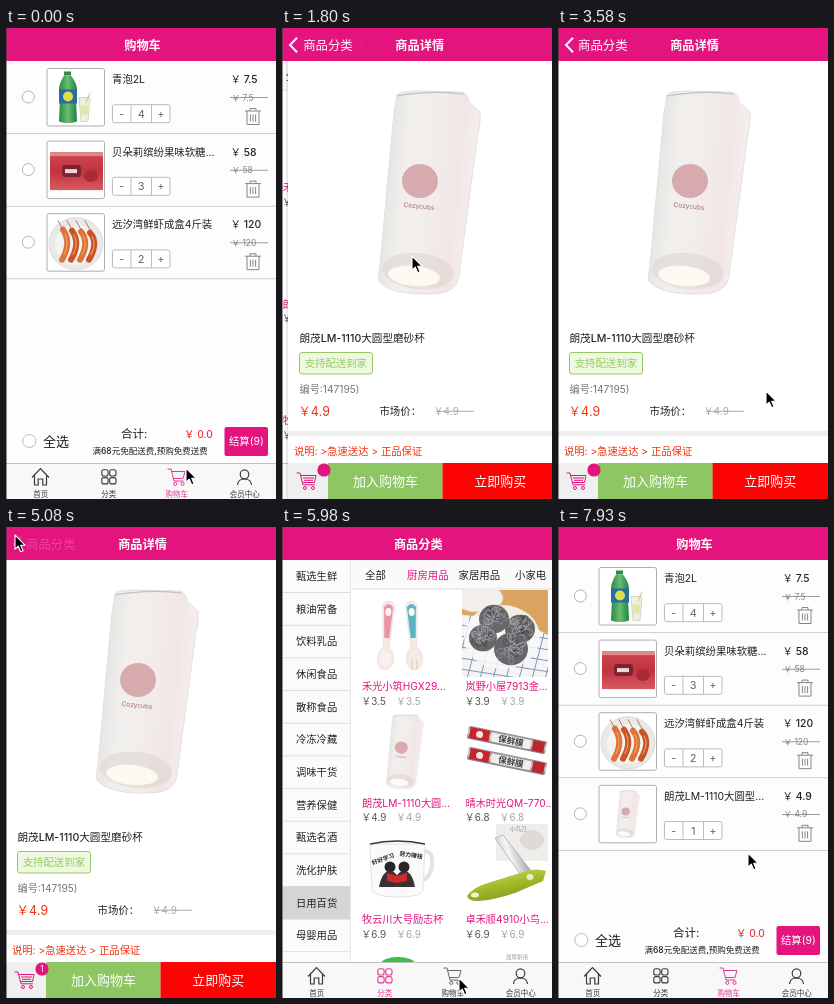
Animation, 270 px wide and 471 px high, one loop 8 s. Source, as an HTML page with a canvas:

```html
<!DOCTYPE html>
<html lang="zh-CN">
<head>
<meta charset="utf-8">
<title>购物车</title>
<style>
html, body { margin: 0; width: 100%; height: 100%; overflow: hidden; background: #fff; }
canvas { display: block; width: 270px; height: 471px; }
</style>
</head>
<body>
<canvas id="stage"></canvas>
<script>
const W = 270, H = 471, LOOP = 8000, STEP = 150;
const PINK = '#e4147f', INK = '#222', RED = '#f0320f', TAU = Math.PI * 2;
const FONT = 'Inter, "Noto Sans CJK SC", "Noto Sans CJK", sans-serif';
const canvas = document.getElementById('stage');
const ctx = canvas.getContext('2d');
const dpr = window.devicePixelRatio || 1;
canvas.width = W * dpr;
canvas.height = H * dpr;

// ---- drawing helpers ----
function text(s, x, y, size, color = INK, weight = 400, align = 'left') {
  ctx.font = `${weight} ${size}px ${FONT}`;
  ctx.textAlign = align;
  ctx.fillStyle = color;
  ctx.fillText(s, x, y + size * 0.37);
}
function rect(x, y, w, h, color) {
  ctx.fillStyle = color;
  ctx.fillRect(x, y, w, h);
}
function paint(fill, stroke, width = 1) {
  if (fill) { ctx.fillStyle = fill; ctx.fill(); }
  if (stroke) { ctx.strokeStyle = stroke; ctx.lineWidth = width; ctx.stroke(); }
}
function round(x, y, w, h, r, fill, stroke, width) {
  ctx.beginPath();
  ctx.roundRect(x, y, w, h, r);
  paint(fill, stroke, width);
}
function oval(x, y, rx, ry, fill, stroke, width, turn = 0) {
  ctx.beginPath();
  ctx.ellipse(x, y, rx, ry, turn, 0, TAU);
  paint(fill, stroke, width);
}
function shape(d, fill, stroke, width) {
  const p = new Path2D(d);
  if (fill) { ctx.fillStyle = fill; ctx.fill(p); }
  if (stroke) { ctx.strokeStyle = stroke; ctx.lineWidth = width || 1; ctx.stroke(p); }
}
function at(x, y, scale, draw, turn = 0) {
  ctx.save();
  ctx.translate(x, y);
  ctx.rotate(turn);
  ctx.scale(scale, scale);
  draw();
  ctx.restore();
}
function blend(x0, y0, x1, y1, ...colors) {
  const g = ctx.createLinearGradient(x0, y0, x1, y1);
  colors.forEach((c, i) => g.addColorStop(i / (colors.length - 1), c));
  return g;
}

// ---- product pictures ----
function cup() {
  shape('M-33 -98Q-31 -102 -10 -102L32 -101Q38 -99 39 -91L50 -81Q51 -73 48 -60L29 83Q27 101 0 101Q-40 102 -51 88Q-52 83 -50 72L-36 -80Z',
    blend(-52, 0, 50, 10, '#e4e2df', '#f1efed', '#f2edeb', '#f1e6e5', '#f6f3f3'), '#dfdbd9', 0.8);
  shape('M-33 -97Q0 -103 34 -99', null, '#c4c0bf', 1.2);
  oval(-12, 78, 36, 18, 'rgba(205,199,190,.35)', null, 0, 0.1);
  oval(-16, 83, 26, 10, 'rgba(255,252,245,.9)', null, 0, 0.1);
  oval(-10, -12, 18, 17, 'rgba(190,104,112,.5)');
  at(-11, 13, 1, () => text('Cozycubs', 0, 0, 6.6, '#a9666d', 400, 'center'), 0.1);
}
function bottle() {
  rect(-4, -26, 7, 4, '#2c8d3f');
  shape('M-4 -22H3Q9 -14 9 -8L8 2L9 24Q0 27 -9 24L-8 2L-9 -8Q-9 -14 -4 -22Z', blend(-9, 0, 9, 0, '#2a8a42', '#69bd70', '#1f8340'));
  rect(-9, -8, 18, 14, '#276da5');
  oval(0, -1, 5, 5, '#d9e04b');
  shape('M11 0H22L20 24H13Z', '#eef0df', '#c4c9bb', 0.7);
  rect(13, 8, 7, 9, '#e3e79f');
  shape('M18 5L22 -5', null, '#c5c98a', 1);
}
function candy() {
  rect(-26, -18, 53, 38, blend(0, -18, 0, 20, '#cf4951', '#c2323f', '#d75a61'));
  rect(-26, -18, 53, 4, '#dd8a8c');
  round(-14, -5, 19, 12, 3, '#7d2434');
  rect(-11, -1, 12, 4, '#ecd9d4');
  oval(15, 6, 7, 6, '#a92a37');
}
function shrimp() {
  oval(0, 1, 27, 26, '#e9e9ea', '#d0d0d0', 0.7);
  oval(0, 2, 21, 20, '#f6f3ef');
  ctx.lineCap = 'round';
  for (let i = 0; i < 4; i++) {
    const x = -13 + i * 9;
    shape(`M${x} ${-13 + i}Q${x + 9} 0 ${x - 1} 17`, null, i % 2 ? '#c95526' : '#dd7438', 6);
    shape(`M${x + 2} ${-9 + i}Q${x + 7} 1 ${x + 1} 12`, null, '#eeaa79', 1);
    shape(`M${x} -13L${x - 5} -22`, null, '#b95432', 0.8);
  }
  ctx.lineCap = 'butt';
}
function cutlery() {
  for (const [x, color, lean] of [[105, '#eb93a8', 0.06], [131, '#59b5c1', -0.06]]) {
    at(x, 107, 1, () => {
      shape('M-6 -29Q0 -37 6 -29L3 14Q9 18 8 28Q5 36 0 36Q-6 36 -8 28Q-9 18 -3 14Z', '#f6e9e6', '#e8d8d4', 0.6);
      shape('M-4.5 -27Q0 -33 4.5 -27L2.5 4H-2.5Z', color);
      oval(0, -22, 3, 4, '#fff4ef');
      if (lean < 0) shape('M-3 36V26M2 36V26', null, '#dfcfcb', 1.2);
      else oval(0, 25, 5, 7, '#fbf0ed');
    }, lean);
  }
}
function wool() {
  ctx.save();
  ctx.beginPath();
  ctx.rect(180, 63, 86, 87);
  ctx.clip();
  rect(180, 63, 86, 87, '#f4f4f6');
  for (let k = 0; k < 9; k++) {
    shape(`M${172 + k * 13} 152L${190 + k * 13} 84M178 ${98 + k * 11}L268 ${112 + k * 11}`, null, '#8195b5', 1);
  }
  shape('M180 63H266V108L236 92L180 88Z', '#dba561');
  oval(196, 71, 25, 14, '#f3f0ec', '#d9d3ca', 1);
  oval(220, 110, 38, 32, 'rgba(250,250,250,.85)');
  let seed = 7;
  const rnd = () => (seed = seed * 16807 % 2147483647) / 2147483647;
  for (const [x, y, r] of [[212, 92, 15], [238, 102, 15], [201, 111, 14], [229, 122, 17]]) {
    oval(x, y, r, r * 0.95, '#67676a');
    for (let i = 0; i < 28; i++) {
      const a = rnd() * TAU, d = Math.sqrt(rnd()) * r * 0.7;
      oval(x + Math.cos(a) * d, y + Math.sin(a) * d, 2 + rnd() * 3, 1.5 + rnd() * 2, null, ['#94959a', '#3e3e41', '#b4b5b8'][i % 3], 0.7, a);
    }
  }
  ctx.restore();
}
function film() {
  for (const y of [213, 234]) {
    at(225, y, 1, () => {
      round(-40, -6.5, 80, 13, 2, blend(0, -7, 0, 7, '#8d8b8b', '#d8d5d4', '#827878'));
      rect(-38, -5.5, 20, 11, '#c6252f');
      rect(-16, -4.5, 40, 9, '#f1eeee');
      rect(26, -5.5, 12, 11, '#b9272f');
      text('保鲜膜', 4, 0, 8.5, '#3c3c3c', 700, 'center');
      oval(-28, 0, 3.5, 3.5, '#f3e3e3');
    }, 0.2);
  }
}
function mug() {
  shape('M141 325Q151 322 150 337Q149 351 140 353', null, '#e4e2e2', 4);
  shape('M88 317H143L141 364Q137 370 116 370Q94 370 90 364Z', '#fbfafa', '#dedcdc', 0.8);
  shape('M88 317Q115 311 143 317', null, '#3b3939', 1.3);
  at(101, 332, 1, () => text('好好学习', 0, 0, 5.8, '#222', 700, 'center'), -0.35);
  at(129, 328, 1, () => text('努力赚钱', 0, 0, 5.8, '#222', 700, 'center'), 0.15);
  for (const x of [108, 122]) {
    oval(x, 340, 5.5, 5.5, '#2b2626');
    shape(`M${x - 11} 360Q${x - 8} 344 ${x} 344Q${x + 8} 344 ${x + 11} 360Z`, '#3a3232');
  }
  shape('M105 346L115 349L125 346V354L115 356L105 354Z', '#d0282f');
}
function peeler() {
  rect(214, 297, 52, 37, '#efedea');
  oval(250, 313, 12, 10, '#dedad5');
  text('小鸟刀', 228, 302, 5.5, '#888');
  shape('M213 311L221 308L254 350L244 356Z', blend(214, 330, 240, 322, '#c2c5c7', '#f4f5f5', '#aeb1b3'), '#a3a6a8', 0.7);
  shape('M185 369Q191 360 209 355L238 346Q254 340 264 344L261 354L233 366Q212 373 196 374Q186 374 185 369Z',
    blend(200, 346, 206, 375, '#c3d554', '#a4bd2b', '#869f25'));
  oval(248, 350, 3.5, 3, '#e9edc4');
  oval(193, 368, 4, 2.5, '#f0f3d0');
}

// ---- icons ----
function trolley(x, y, color) {
  at(x, y, 1, () => {
    shape('M-9 -8H-5.5L-2.5 4H7M-4.9 -5.5H8.5L6.5 1.5H-3', null, color, 1);
    oval(-1.2, 6.8, 1.6, 1.6, null, color);
    oval(6, 6.8, 1.6, 1.6, null, color);
  });
}
function basket(color) {
  shape('M8.5 445H12L15 456.8H27M12.6 447.5H28L26.5 454.5H14.4M15 450H26M16 452.3H25', null, color, 1);
  oval(17, 460, 1.5, 1.5, null, color);
  oval(25, 460, 1.5, 1.5, null, color);
}
function trash(x, y) {
  at(x, y, 1, () => {
    shape('M-8 -5.5H8M-3 -5.5V-8H3V-5.5M-6 -5.5V8H6V-5.5M-2.6 -2V5M0 -2V5M2.6 -2V5', null, '#858585', 1);
  });
}
function tabBar(active) {
  rect(0, 435, W, 36, '#f8f8f8');
  rect(0, 435, W, 0.8, '#b5b5b5');
  const tint = (i, idle = '#3a3a3a') => i === active ? '#e23c95' : idle;
  shape('M26 449.5L34.5 440.5L43 449.5M28.5 447.5V457H32.2V451H36.8V457H40.5V447.5', null, tint(0), 1.2);
  for (let i = 0; i < 4; i++)
    round(95.8 + (i % 2) * 7.9, 441.7 + (i >> 1) * 7.9, 6.3, 6.3, 2, null, tint(1), 1.1);
  trolley(170.5, 449, tint(2, '#666'));
  oval(238.5, 446.3, 4.3, 4.5, null, tint(3), 1.2);
  shape('M231.5 457Q232 451 238.5 451Q245 451 245.5 457', null, tint(3), 1.2);
  ['首页', '分类', '购物车', '会员中心'].forEach((s, i) => text(s, 34.7 + i * 68, 466, 7.5, tint(i), 400, 'center'));
}

// ---- pages ----
const goods = [
  ['青泡2L', '7.5', 4, bottle],
  ['贝朵莉缤纷果味软糖…', '58', 3, candy],
  ['远汐湾鲜虾成盒4斤装', '120', 2, shrimp],
  ['朗茂LM-1110大圆型…', '4.9', 1, () => at(0, 0, 0.235, cup)]
];
function cartPage(rows) {
  rect(0, 0, W, H, '#fdfdfd');
  goods.slice(0, rows).forEach(([name, price, count, picture], i) => {
    const y = 33 + i * 72.6;
    oval(22.3, y + 36, 6, 6, '#fff', '#a3b0bd', 0.9);
    round(41, y + 7.5, 57.5, 57.5, 2, '#fff', '#a5a5a5', 0.9);
    at(i ? 70 : 62, y + 36.5, 1, picture);
    text(name, 106, y + 18.3, 10.4);
    round(106.5, y + 43.7, 57.5, 18, 2, '#fff', '#b5b5b5', 0.9);
    rect(124.5, y + 44, 0.9, 17.5, '#b5b5b5');
    rect(145, y + 44, 0.9, 17.5, '#b5b5b5');
    ['-', count, '+'].forEach((s, k) => text(s, 115.5 + k * 19.7, y + 52.8, 11, '#666', 400, 'center'));
    text('￥ ' + price, 224.5, y + 18.3, 10.4, INK, 500);
    text('￥ ' + price, 225.5, y + 36.5, 8.5, '#858585');
    rect(224, y + 36.2, 38, 0.8, '#858585');
    trash(247, y + 55.5);
    rect(0, y + 72.2, W, 0.8, '#c6c6c6');
  });
  oval(23.3, 413, 6.5, 6.5, '#fff', '#b0b5ba', 0.9);
  text('全选', 37, 413, 13);
  text('合计:', 115, 406, 11.5);
  text('￥ 0.0', 178, 406.5, 10.4, '#f01818');
  text('满68元免配送费,预购免费送费', 86.5, 423.3, 8.5, INK, 500);
  round(218.5, 399, 43.5, 29, 2, PINK);
  text('结算(9)', 240.3, 413.5, 10.4, '#fff', 400, 'center');
  tabBar(2);
  header();
  text('购物车', 136.5, 17, 12.2, '#fff', 600, 'center');
}

const kinds = ['甄选生鲜', '粮油常备', '饮料乳品', '休闲食品', '散称食品', '冷冻冷藏',
  '调味干货', '营养保健', '甄选名酒', '洗化护肤', '日用百货', '母婴用品'];
const shelf = [
  ['禾光小筑HGX29…', '3.5'], ['岚野小屋7913金…', '3.9'],
  ['朗茂LM-1110大圆…', '4.9'], ['晴木时光QM-770…', '6.8'],
  ['牧云川大号励志杯', '6.9'], ['卓禾顺4910小鸟…', '6.9']
];
function categoryPage() {
  rect(0, 0, W, H, '#fff');
  rect(68, 33, W - 68, 29, '#fafafa');
  rect(68, 61.6, W - 68, 0.8, '#d6d6d6');
  rect(0, 33, 68, 402, '#fbfbfb');
  kinds.forEach((s, i) => {
    const y = 33 + i * 32.65;
    if (i === 10) rect(0, y, 68, 32.6, '#d5d5d5');
    text(s, 14, y + 16.3, 10.3, INK);
    rect(0, y + 32.2, 68, 0.8, '#d8d8d8');
  });
  rect(68, 33, 0.8, 402, '#e2e2e2');
  [['全部', 83], ['厨房用品', 125], ['家居用品', 176.5], ['小家电', 233]].forEach(([s, x], i) =>
    text(s, x, 48, 10.4, i === 1 ? PINK : INK));
  cutlery();
  wool();
  at(123, 225, 0.366, cup);
  film();
  mug();
  peeler();
  shelf.forEach(([name, price], i) => {
    const x = 80 + (i % 2) * 103.5, y = 159.3 + (i >> 1) * 116.5;
    text(name, x, y, 10.2, PINK);
    text('￥' + price, x - 0.7, y + 14.7, 9.9, '#555');
    text('￥' + price, x + 34, y + 14.7, 9.9, '#a5a5a5');
  });
  oval(116, 437, 17, 7, '#39c04b');
  text('加厚耐用', 224, 430, 5.5, '#999');
  tabBar(1);
}

function detailPage(off, count) {
  ctx.save();
  ctx.translate(off, 0);
  rect(-3, 33, 3, H, blend(-3, 0, 0, 0, 'rgba(0,0,0,0)', 'rgba(0,0,0,.12)'));
  rect(0, 33, W, H, '#fff');
  at(142, 165, 1, cup);
  text('朗茂LM-1110大圆型磨砂杯', 11.5, 310, 10.6, INK, 500);
  round(11.5, 324.5, 73, 21.5, 2.5, '#eef9e0', '#93c968', 1);
  text('支持配送到家', 16.7, 335.3, 10.4, '#93cb62');
  text('编号:147195)', 11.5, 361, 10.2, '#777');
  text('￥4.9', 10.5, 383, 12.4, RED);
  text('市场价：', 91.5, 383, 10.4, INK, 500);
  text('￥4.9', 145.5, 383, 10, '#aaa');
  rect(148, 382.8, 38, 0.8, '#999');
  rect(0, 403, W, 5, '#efefef');
  text('说明: >急速送达 > 正品保证', 6, 423, 10.3, RED);
  rect(0, 435, 40, 36, '#efeff0');
  rect(40, 435, 114.5, 36, '#8dc663');
  rect(154.5, 435, 115.5, 36, '#fc0404');
  text('加入购物车', 97.5, 453, 13, '#fff', 400, 'center');
  text('立即购买', 212.2, 453, 13, '#fff', 400, 'center');
  basket(PINK);
  oval(36, 442, 6.6, 6.6, PINK);
  if (count) text('1', 36, 442.3, 8.5, '#fff', 400, 'center');
  ctx.restore();
}

function header() {
  rect(0, 0, W, 33, PINK);
}
function shopHeader(off, pressed) {
  const p = 1 - off / W;
  header();
  ctx.globalAlpha = 1 - p;
  text('商品分类', 136.3 - 80 * p, 17, 12.2, '#fff', 600, 'center');
  ctx.globalAlpha = p;
  text('商品详情', 136.5 + off * 0.2, 17, 12.2, '#fff', 600, 'center');
  ctx.globalAlpha = p * (pressed ? 0.2 : 1);
  shape('M15 9.8L8 17L15 24.2', null, '#fff', 2);
  text('商品分类', 20 + off * 0.2, 17, 12.4, '#fff');
  ctx.globalAlpha = 1;
}

// ---- motion ----
const path = [
  [150, 180, 440], [600, 112, 452], [750, 104, 452], [900, 106, 438], [1350, 130, 231],
  [1500, 131, 228], [1800, 130, 228], [1950, 129, 232], [2400, 70, 440], [2850, 19, 451],
  [3300, 92, 450], [3600, 208, 363], [4050, 208, 363], [4950, 11, 10], [5100, 9, 8],
  [5250, 9, 8], [5850, 174, 446], [6000, 177, 451], [6300, 177, 451], [6750, 160, 306],
  [7050, 100, 294], [7200, 67, 284], [7650, 211, 302], [7950, 190, 326]
];
function cursor(t) {
  const i = path.findIndex(k => k[0] > t);
  let [x, y] = path[path.length - 1].slice(1);
  if (i === 0) [x, y] = path[0].slice(1);
  if (i > 0) {
    const a = path[i - 1], b = path[i];
    const u = (t - a[0]) / (b[0] - a[0]), e = u * u * (3 - 2 * u);
    x = a[1] + (b[1] - a[1]) * e;
    y = a[2] + (b[2] - a[2]) * e;
  }
  at(x, y, 1, () => {
    ctx.lineJoin = 'round';
    shape('M0 0V14.2L3.3 11.1L5.7 16.8L8.1 15.7L5.7 10.3H10.2Z', '#000', '#fff', 1.1);
    ctx.lineJoin = 'miter';
  });
}
function left(t, start) {
  const u = Math.min(1, Math.max(0, (t - start) / 400));
  return Math.pow(1 - u, 5.5);
}
// The screen refreshes about every 150 ms, slightly earlier late in the loop.
function tick(t) {
  const lead = t < 1940 ? 0 : t < 3130 ? 10 : 20;
  return Math.floor((t + lead) / STEP) * STEP;
}
function draw(ms) {
  const t = tick(ms);
  ctx.setTransform(dpr, 0, 0, dpr, 0, 0);
  if (t < 750) cartPage(3);
  else if (t >= 6300) cartPage(4);
  else {
    const off = W * (t < 5200 ? left(t, 1600) : 1 - left(t, 5200));
    ctx.save();
    ctx.translate(-0.3 * (W - off), 0);
    categoryPage();
    ctx.restore();
    if (off < W) detailPage(off, t >= 3900);
    shopHeader(off, t >= 5100);
  }
  rect(0, 0, 0.8, H, 'rgba(60,60,60,.7)');
  cursor(t);
}

const begin = performance.now();
function frame() {
  draw((performance.now() - begin) % LOOP);
  requestAnimationFrame(frame);
}
frame();
</script>
</body>
</html>
```
